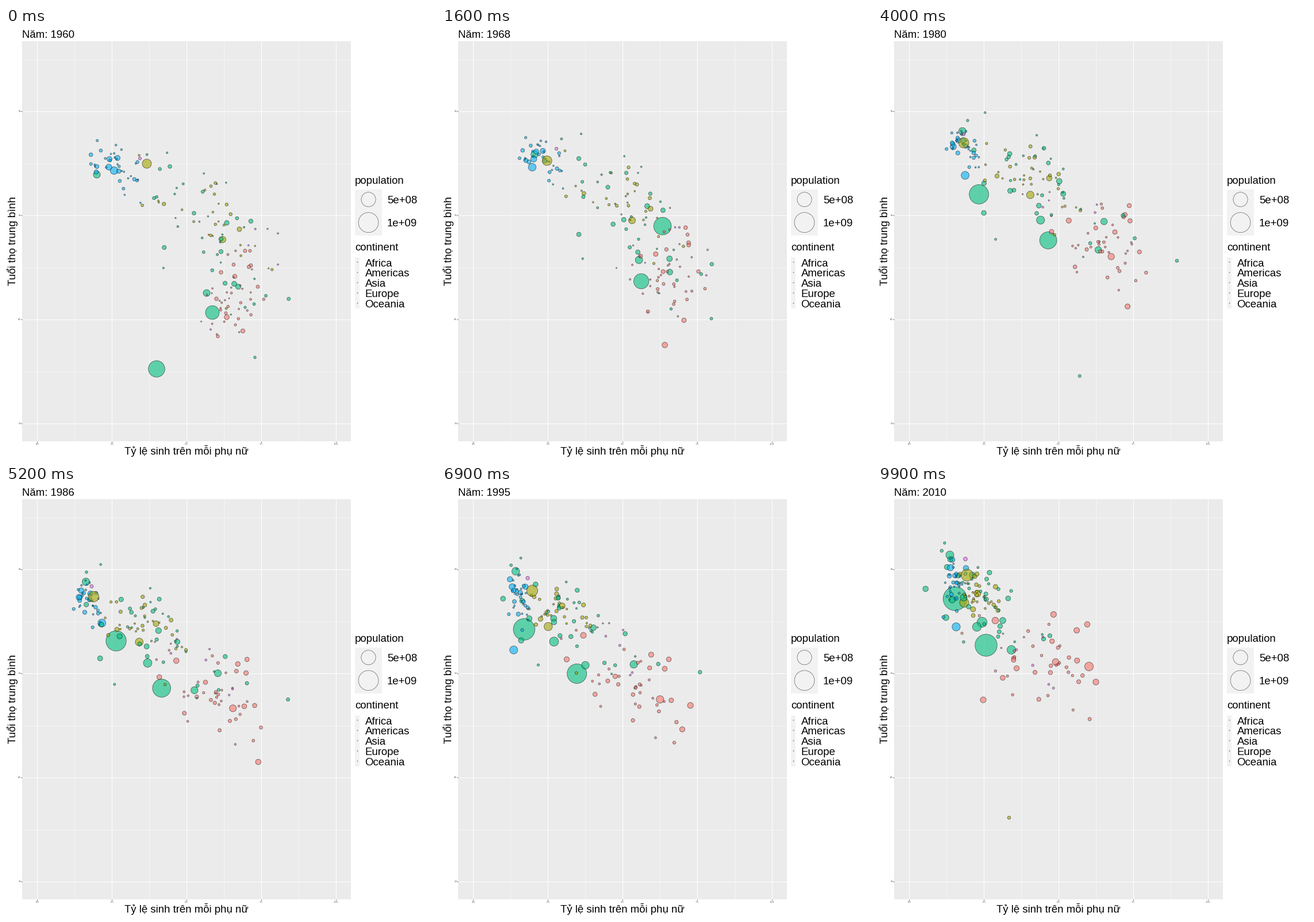
Animation, 748 px wide and 748 px high, one loop 10 s. Source, as a matplotlib script:

```python
import matplotlib.pyplot as plt
import numpy as np
from matplotlib.animation import FuncAnimation
from matplotlib.patches import Circle, Rectangle

SIZE, DPI, FRAMES = 748, 88, 100
PT = 72 / DPI  # points per pixel
STAGES = (1960, 1980, 1995, 2010)
AFRICA, AMERICAS, ASIA, EUROPE, OCEANIA = (
    "#F8766D", "#A3A500", "#00BF7D", "#00B0F6", "#E76BF3")
GROWTH = {AFRICA: 1.6, AMERICAS: 1.45, ASIA: 1.45, EUROPE: 1.06, OCEANIA: 1.35}

plt.rcParams["font.family"] = "Liberation Sans"
rng = np.random.default_rng(7)
years = 1960 + 50 * np.arange(FRAMES) / (FRAMES - 1)
share = np.linspace(0, 1, FRAMES)
dots = []  # (colour, x, y and radius over the loop)


def add(color, r, x, y, growth=None):
    dots.append((color, x, y, r * (1 + ((growth or GROWTH[color]) - 1) * share)))


def track(color, r, *points, when=STAGES, growth=None):
    if len(points) == 5:
        when = (1960, 1968, 1980, 1995, 2010)
    x, y = zip(*points)
    add(color, r, np.interp(years, when, x), np.interp(years, when, y), growth)


def swarm(color, count, low, high, *stages):
    """Dots scattered round a moving centre: (x, y, x spread, y spread, correlation)."""
    cx, cy, sx, sy, rho = (np.interp(years, STAGES, s) for s in zip(*stages))
    turn = 0.9 * share
    for _ in range(count):
        a, b = rng.normal(size=(2, 2)).clip(-1.9, 1.9)
        u, v = np.outer(a, np.cos(turn)) + np.outer(b, np.sin(turn))
        r = low + (high - low) * rng.random() ** 2.5
        add(color, r, cx + sx * u, cy + sy * (rho * u + np.sqrt(1 - rho ** 2) * v))


# Giants
track(ASIA, 14.3, (262, 593), (225, 590), (439, 400), (365, 365), (385, 345), (175, 290),
      (193, 270), (142, 249), (134, 196),
      when=(1960, 1961, 1963, 1965, 1968, 1980, 1986, 1995, 2010))
track(ASIA, 12, (359, 495), (347, 441), (297, 370), (234, 326), (188, 277), growth=1.6)
track(ASIA, 6, (349, 461), (343, 404), (284, 335), (194, 270), (181, 237))
track(ASIA, 6.1, (158, 255), (161, 220), (147, 180), (128, 148), (125, 120), growth=1.14)
track(EUROPE, 6.7, (188, 248), (157, 242), (151, 257), (168, 237), (124, 286), (121, 281),
      (136, 245), when=(1960, 1968, 1980, 1986, 1995, 2002, 2010))
track(AMERICAS, 5.5, (377, 368), (331, 335), (266, 291), (184, 244), (150, 203))

# Mid-sized populations
track(ASIA, 4.4, (397, 445), (394, 337), (333, 310), (232, 285), growth=1.7)
track(ASIA, 4.5, (404, 450), (385, 387), (248, 311), (172, 245), growth=1.7)
track(ASIA, 4.1, (384, 339), (317, 267), (193, 230), (149, 194))
track(ASIA, 3.6, (381, 444), (281, 310), (194, 236), (164, 155))
track(ASIA, 3.7, (374, 367), (231, 284), (151, 230), (129, 198))
track(ASIA, 3.7, (426, 336), (323, 289), (263, 246), (217, 234))
track(ASIA, 3.6, (374, 389), (185, 271), (139, 199), (120, 141), growth=1.28)
track(ASIA, 2.1, (433, 573), (521, 406), (525, 355), (448, 323), (288, 266),
      when=(1960, 1980, 1986, 1995, 2010), growth=1.7) if False else None
track(EUROPE, 5.2, (179, 242), (131, 207), (122, 175), (126, 142))
track(EUROPE, 4.5, (194, 226), (148, 196), (145, 175), (153, 143))
track(EUROPE, 4.5, (180, 228), (140, 196), (118, 162), (129, 128))
track(AFRICA, 3.6, (398, 432), (333, 336), (245, 259), (204, 234))
track(AFRICA, 3.2, (366, 471), (412, 354), (418, 424), (379, 341))
track(AFRICA, 3.2, (374, 425), (303, 355), (216, 301), (183, 372))
track(AMERICAS, 4, (406, 350), (299, 262), (208, 208), (173, 187))
track(OCEANIA, 2.5, (233, 227), (149, 185), (149, 160), (152, 127))
track(ASIA, 2.2, (433, 573), (521, 406), (448, 323), (288, 266), growth=1.65)

# Paths with sudden drops in life expectancy
track(AFRICA, 4.3, (384, 503), (389, 480), (387, 583), (391, 470), (406, 398), (379, 371),
      (367, 314), when=(1960, 1966, 1969, 1971, 1980, 1995, 2010), growth=1.75)
track(AFRICA, 3.6, (412, 527), (434, 481), (437, 548), (439, 483), (432, 380), (309, 306),
      when=(1960, 1980, 1984, 1986, 1995, 2010))
track(ASIA, 2.1, (416, 486), (390, 490), (345, 671), (350, 614), (372, 356), (300, 311),
      (209, 262), when=(1960, 1972, 1977, 1980, 1986, 1995, 2010))
track(AMERICAS, 1.9, (383, 488), (369, 410), (308, 360), (233, 325), (228, 577),
      when=(1960, 1980, 1995, 2009, 2010))

# Small populations
swarm(AFRICA, 38, 1.3, 3.2, (405, 475, 30, 46, 0), (407, 395, 48, 52, 0.55),
      (345, 370, 62, 62, 0.75), (300, 325, 72, 56, 0.6))
swarm(AMERICAS, 28, 1.2, 3.3, (357, 328, 66, 60, 0.75), (265, 258, 58, 44, 0.75),
      (201, 217, 42, 26, 0.6), (175, 192, 25, 26, 0.5))
swarm(ASIA, 33, 1.2, 3.6, (355, 362, 72, 78, 0.65), (300, 288, 85, 60, 0.55),
      (240, 245, 72, 48, 0.6), (195, 208, 55, 44, 0.6))
swarm(EUROPE, 33, 1.3, 4.3, (199, 244, 27, 27, 0.4), (156, 207, 17, 20, 0.3),
      (138, 192, 10, 30, 0), (136, 164, 11, 32, -0.5))
swarm(OCEANIA, 8, 1, 1.8, (397, 420, 40, 70, -0.5), (340, 310, 55, 40, 0.6),
      (300, 261, 18, 38, 0.5), (262, 288, 32, 40, 0.3))

track(AMERICAS, 8, (245, 236), (183, 231), (149, 200), (157, 182), (155, 155), growth=1.29)

fig = plt.figure(figsize=(SIZE / DPI, SIZE / DPI), dpi=DPI, facecolor="white")
ax = fig.add_axes([0, 0, 1, 1])
ax.set(xlim=(0, SIZE), ylim=(SIZE, 0))
ax.axis("off")


def label(x, y, text, size=18.67, **kw):
    return ax.text(x, y, text, fontsize=size * PT, **{"va": "baseline", **kw})


def tick_label(x, y, text, ha):
    label(x, y, text, 4.3, ha=ha, va="center", color="#4D4D4D")


def box(x0, y0, x1, y1, color):
    ax.add_patch(Rectangle((x0, y0), x1 - x0, y1 - y0, fc=color, lw=0, zorder=0))


def line(xs, ys, width, color="white"):
    ax.plot(xs, ys, color=color, lw=width * PT, zorder=1, solid_capstyle="butt")


LEFT, TOP, RIGHT, BOTTOM = 28.5, 22.5, 600, 718.5
box(LEFT, TOP, RIGHT, BOTTOM, "#EBEBEB")
for k in range(9):
    x = 54.5 + 64.9 * k
    line((x, x), (TOP, BOTTOM), 0.5 if k % 2 else 1)
    if k % 2 == 0:
        line((x, x), (BOTTOM, BOTTOM + 2), 0.8, "#333333")
        tick_label(x, 724, f"{k * 1.25:.1f}", "center")
for k in range(8):
    y = 688 - 90.45 * k
    line((LEFT, RIGHT), (y, y), 0.5 if k % 2 else 1)
    if k % 2 == 0:
        line((LEFT - 2, LEFT), (y, y), 0.8, "#333333")
        tick_label(26, y, str(20 + 10 * k), "right")

title = label(LEFT, 17, "")
label(314, 742, "Tỷ lệ sinh trên mỗi phụ nữ", ha="center")
label(17, 370.5, "Tuổi thọ trung bình", ha="center", rotation=90, rotation_mode="anchor")

label(607, 271, "population")
box(607, 281, 654, 361, "#F2F2F2")
for y, r, name in ((298.3, 12.6, "5e+08"), (338.3, 17.4, "1e+09")):
    ax.add_patch(Circle((630.5, y), r, fill=False, ec=(0, 0, 0, 0.6), lw=0.7 * PT))
    label(663, y + 7, name)
label(607, 387, "continent")
box(607, 398.5, 615.5, 488, "#F2F2F2")
for k, name in enumerate(("Africa", "Americas", "Asia", "Europe", "Oceania")):
    y = 407.4 + 17.8 * k
    ax.add_patch(Circle((611.5, y), 0.9, fc=(0, 0, 0, 0.5), lw=0))
    label(624.5, y + 7.2, name)

colors = [d[0] for d in dots]
px, py, radius = (np.array([d[k] for d in dots]) for k in (1, 2, 3))
cloud = ax.scatter(px[:, 0], py[:, 0], c=colors, alpha=0.6, edgecolors="black",
                   linewidths=0.75 * PT, zorder=3)


def update(i):
    cloud.set_offsets(np.column_stack((px[:, i], py[:, i])))
    cloud.set_sizes((2 * radius[:, i] * PT) ** 2)
    title.set_text(f"Năm: {round(years[i])}")
    return cloud, title


anim = FuncAnimation(fig, update, frames=FRAMES, interval=100, repeat=True, repeat_delay=0)
plt.show()
```
